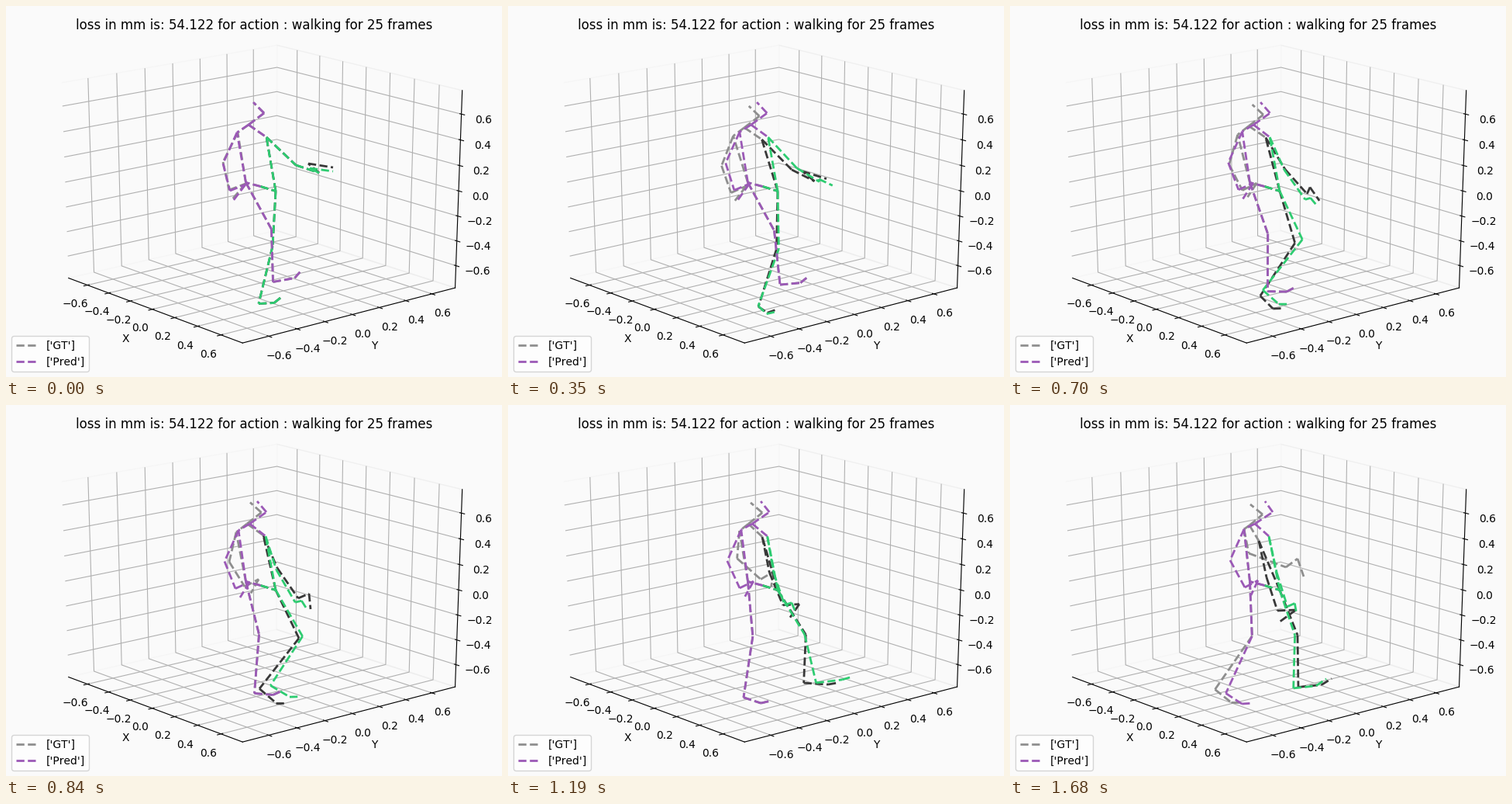
Write a matplotlib script that moves like this. It is 640 px wide and 478 px high and loops after 1.75 s.

```python
import numpy as np
import matplotlib.pyplot as plt
from matplotlib.animation import FuncAnimation
from matplotlib.patches import Polygon

W, H, DPI = 640, 478, 100
FRAMES, INTERVAL = 25, 70
BG = "#fafafa"

plt.rcParams["font.family"] = "DejaVu Sans"
plt.rcParams["text.kerning_factor"] = 6
fig = plt.figure(figsize=(W / DPI, H / DPI), dpi=DPI, facecolor=BG)
ax = fig.add_axes([0, 0, 1, 1], facecolor=BG)
ax.set(xlim=(0, W), ylim=(H, 0), xticks=[], yticks=[])
ax.spines[:].set_visible(False)

# Perspective camera looking at a cube with sides from -0.75 to 0.75
AZIM, ELEV = np.radians([-40, 20])
ca, sa, ce, se = np.cos(AZIM), np.sin(AZIM), np.cos(ELEV), np.sin(ELEV)
RIGHT = np.array([-sa, ca, 0])
UP = np.array([-ca * se, -sa * se, ce])
TO_EYE = np.array([ca * ce, sa * ce, se])


def project(points):
    p = np.atleast_2d(points) / 1.5
    depth = 10 - p @ TO_EYE
    x = (p @ RIGHT / depth + 0.095) / 0.185 * W
    y = H - (p @ UP / depth + 0.095) / 0.185 * H
    return np.column_stack([x, y])


def line3d(points, color, cap="projecting"):
    ax.plot(*project(points).T, color=color, lw=0.8, solid_capstyle=cap)


def text3d(point, text, va):
    x, y = project(point)[0]
    ax.text(x, y, text, fontsize=10, ha="center", va=va)


E = 0.75 + 1.5 / 48          # edge of the panes
TICK_PAD, NAME_PAD = 0.0857, 0.186
TICKS = np.arange(-3, 4) * 0.2


def draw_panes():
    panes = [
        ([(-E, -E, -E), (-E, E, -E), (-E, E, E), (-E, -E, E)], 0.95),
        ([(-E, E, -E), (E, E, -E), (E, E, E), (-E, E, E)], 0.90),
        ([(-E, -E, -E), (E, -E, -E), (E, E, -E), (-E, E, -E)], 0.925),
    ]
    for corners, grey in panes:
        ax.add_patch(Polygon(project(corners), closed=False, fill=False,
                             edgecolor=(grey, grey, grey, 0.5), lw=1))


def draw_axis(axis, name, edge, corners, tick_dir):
    """edge: where the axis lies; corners: what each grid line visits."""
    def at(value, base, shift=0):
        p = np.array(base, float)
        p += np.sign(p) * shift
        p[axis] = value
        return p

    line3d([at(-E, edge), at(E, edge)], "black")
    for t in TICKS:
        line3d([at(t, corner) for corner in corners], "#b0b0b0", "butt")
    for t in TICKS:
        ends = np.array([at(t, edge), at(t, edge)])
        ends[:, tick_dir] += np.sign(edge[tick_dir]) * np.array([0.025, -0.0125])
        line3d(ends, "black")
        label = f"{t:.1f}".replace("-0.0", "0.0").replace("-", "\u2212")
        text3d(at(t, edge, TICK_PAD), label, "top")
    if name:
        text3d(at(0, edge, NAME_PAD), name, "center")


draw_panes()
draw_axis(0, "X", (0, -E, -E), [(0, -E, -E), (0, E, -E), (0, E, E)], 1)
draw_axis(1, "Y", (E, 0, -E), [(E, 0, -E), (-E, 0, -E), (-E, 0, E)], 0)
draw_axis(2, "", (E, E, 0), [(-E, -E, 0), (-E, E, 0), (E, E, 0)], 0)
ax.text(W / 2, 29.9, "loss in mm is: 54.122 for action : walking for 25 frames",
        fontsize=12, ha="center", va="baseline")

# Every joint hangs on the one before it; a bone is a screen vector that
# glides through a few key vectors.
TIME = np.arange(FRAMES)
STRIDE = np.array([0, 7, 12, 20, 24])     # key moments of the walk


def glide(t, *keys):
    """Smooth curve through the keys: the stride moments, or evenly spaced."""
    keys = np.array(keys, float)
    n = len(keys)
    if n == 1:
        return np.repeat(keys, len(t), axis=0)
    times = STRIDE if n == len(STRIDE) else np.linspace(0, FRAMES - 1, n)
    slope = np.gradient(keys, times, axis=0)
    i = np.clip(np.searchsorted(times, t, side="right") - 1, 0, n - 2)
    span = (times[i + 1] - times[i])[:, None]
    s = (t - times[i])[:, None] / span
    return ((1 + 2 * s) * (1 - s) ** 2 * keys[i]
            + s * (1 - s) ** 2 * span * slope[i]
            + s * s * (3 - 2 * s) * keys[i + 1]
            + s * s * (s - 1) * span * slope[i + 1])


def chain(root, bones, t=TIME):
    joints = [root]
    for keys in bones:
        joints.append(joints[-1] + glide(t, *keys))
    return joints


PELVIS, LEFT_HIP, RIGHT_HIP = (
    glide(TIME, p) for p in [(328.5, 232.5), (309.5, 227.5), (348, 238.5)])

# Legs: thigh, shin, foot, toes
RIGHT_LEG = [
    [(-4, 71), (3, 74), (30, 62), (33, 57), (23, 58)],
    [(-18, 74), (-28, 73), (-51, 65), (19, 63), (1, 67)],
    [(20, -1), (11, 11), (21, 18), (34, -6), (30, -3)],
    [(10, -8), (12, 0), (13, -8)],
]
LEFT_LEG = [
    [(33, 60), (32, 63), (17, 68), (3, 71), (3, 70)],
    [(2, 68), (7, 71), (-6, 76), (-21, 77), (-48, 69)],
    [(28, -5), (24, 2), (20, 16)],
    [(7, -8), (11, 0)],
]
# Right arm, the same swing for both figures: upper arm, forearm
RIGHT_ARM = [
    [(38, 36), (36, 40), (18, 42), (8, 48), (10, 47)],
    [(30, 10), (29, 19), (27, 39), (13, 41), (14, 43)],
]

# The prediction moves its right side early and never ends the left step
early = TIME + 1.8 * np.minimum(TIME / 6, 1)
stalled = np.minimum(TIME, 22)


class Skeleton:
    def __init__(self, label, left_color, right_color, neck, head, left_shoulder,
                 right_shoulder, left_arm, right_hand, right_t, left_t):
        top = chain(glide(TIME, *neck), head)
        l_arm = chain(top[0] + glide(TIME, *left_shoulder), left_arm)
        r_arm = chain(top[0] + glide(TIME, *right_shoulder),
                      RIGHT_ARM + right_hand, right_t)
        parts = [
            (chain(RIGHT_HIP, RIGHT_LEG, right_t), right_color),
            (chain(LEFT_HIP, LEFT_LEG, left_t), left_color),
            ([PELVIS, RIGHT_HIP], right_color),
            ([PELVIS, LEFT_HIP], left_color),
            ([LEFT_HIP] + l_arm, left_color),
            ([RIGHT_HIP] + r_arm, right_color),
            ([top[0], r_arm[0]], left_color),
            ([top[0], l_arm[0]], left_color),
            (top, left_color),
        ]
        self.bones = []
        for joints, color in parts:
            for a, b in zip(joints, joints[1:]):
                line, = ax.plot([], [], "--", lw=2, color=color)
                self.bones.append((line, a, b))
        self.key, = ax.plot([], [], "--", lw=2, color=left_color, label=label)

    def pose(self, n):
        for line, a, b in self.bones:
            line.set_data([a[n, 0], b[n, 0]], [a[n, 1], b[n, 1]])


truth = Skeleton(
    "['GT']", "#8e8e8e", "#383838",
    neck=[(313, 153), (304, 157), (311, 153), (309, 154), (309, 155)],
    head=[[(20, -15), (17, -14)], [(-13, -13), (-16, -13)]],
    left_shoulder=[(-14, 10), (-14, 11), (-7, 5)],
    right_shoulder=[(23, 16), (21, 15), (12, 20)],
    left_arm=[[(-19, 38), (-9, 38), (6, 31)], [(8, 36), (20, 32), (48, 18)],
              [(21, -8), (15, -11)], [(-17, 20), (-10, 18), (8, 23)]],
    right_hand=[[(-14, -12), (-12, -12), (14, -6), (22, 0), (24, -1)],
                [(32, 5), (27, 12), (2, 20), (-17, 15), (-22, 16)]],
    right_t=TIME, left_t=TIME)
guess = Skeleton(
    "['Pred']", "#9b59b6", "#2ecc71",
    neck=[(313, 153), (316, 153)],
    head=[[(20, -15), (23, -15)], [(-14, -14), (-10, -14)]],
    left_shoulder=[(-15, 10), (-14, 7)],
    right_shoulder=[(23, 16), (18, 16)],
    left_arm=[[(-18, 40)], [(9, 35), (19, 35)],
              [(20, -8), (17, -9)], [(-16, 21), (-9, 19)]],
    right_hand=[[(-12, -6), (7, -2), (9, -4)], [(30, 4), (9, 11), (3, 11)]],
    right_t=early, left_t=stalled)
ax.legend(handles=[truth.key, guess.key], loc="lower left", fontsize=10)


def update(n):
    truth.pose(n)
    guess.pose(n)
    return []


anim = FuncAnimation(fig, update, frames=FRAMES, interval=INTERVAL,
                     init_func=lambda: update(0), repeat=True, repeat_delay=0)
plt.show()
```
